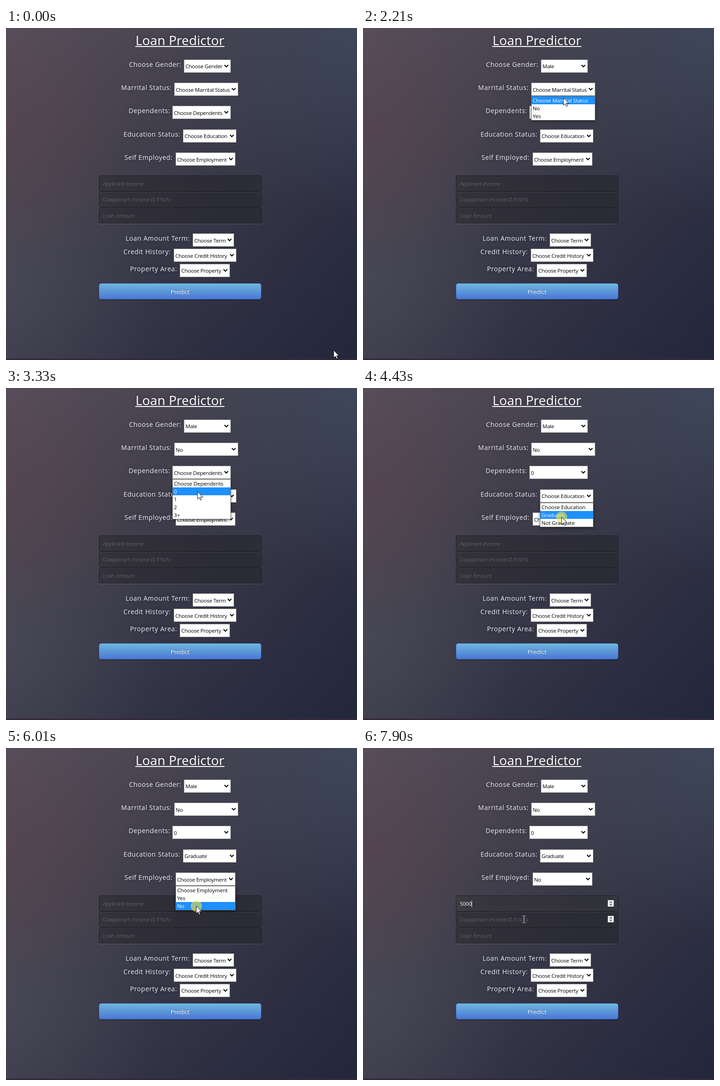
An HTML page for the animation above (8000 ms loop, 760x718 px).

```html
<!DOCTYPE html>
<html lang="en">
<head>
<meta charset="utf-8">
<title>Loan Predictor</title>
<style>
  html, body { margin: 0; width: 100%; height: 100%; overflow: hidden; }
  body {
    position: relative;
    background:
      linear-gradient(#33293b, #33293b) 0 715px / 100% 3px no-repeat,
      radial-gradient(ellipse 260px 300px at 0 210px, rgba(92, 66, 74, .45), rgba(92, 66, 74, 0)),
      radial-gradient(ellipse 420px 420px at 760px 0, rgba(64, 78, 98, .65), rgba(64, 78, 98, 0)),
      radial-gradient(ellipse 330px 330px at 0 560px, rgba(76, 78, 92, .5), rgba(76, 78, 92, 0)),
      linear-gradient(133deg, #574f5c 0%, #47434f 28%, #373747 56%, #2b2d40 80%, #23273b 100%);
  }
  .field, .button {
    position: absolute; left: 201px; width: 352px; height: 35px; box-sizing: border-box;
  }
  .field {
    --glow: .2;
    background: rgba(0, 0, 0, .3);
    border: 1px solid rgba(0, 0, 0, .3);
    border-radius: 4px;
    box-shadow: inset 0 -5px 45px rgba(100, 100, 100, var(--glow)), 0 1px 1px rgba(255, 255, 255, .2);
  }
  .button {
    top: 552px;
    background: linear-gradient(#6eb6de, #4a77d4);
    border: 1px solid #3762bc;
    border-radius: 5px;
    box-shadow: inset 0 1px 0 rgba(255, 255, 255, .2), 0 1px 2px rgba(0, 0, 0, .5);
  }
  svg { position: absolute; left: 0; top: 0; }
  text { font: 11.5px "Open Sans", "Noto Sans", sans-serif; }
  .title { font-size: 28px; letter-spacing: .1px; fill: #fff; text-anchor: middle; }
  .title, .label { text-shadow: 0 0 10px rgba(0, 0, 0, .3); }
  .label { font-size: 14px; letter-spacing: .6px; fill: #eef0f6; text-anchor: middle; }
  .value { letter-spacing: -.22px; }
  .option { letter-spacing: -.08px; }
  .hint { font-weight: 300; letter-spacing: -.1px; fill: #7a787e; }
  .typed { font-size: 11px; fill: #fff; }
  .predict { font-size: 12.5px; fill: #fff; text-anchor: middle; text-shadow: 0 -1px 1px rgba(0, 0, 0, .4); }
  .menu { filter: drop-shadow(0 2px 3px rgba(0, 0, 0, .45)); }
</style>
</head>
<body>
<div class="field" style="top:319px"></div>
<div class="field" style="top:353px"></div>
<div class="field" style="top:388px"></div>
<div class="button"></div>
<svg width="760" height="718" viewBox="0 0 760 718">
  <text class="title" x="376.5" y="37">Loan Predictor</text>
  <path d="M280 40H473" stroke="#fff" stroke-width="1.8"/>
  <g id="form"></g>
  <text class="predict" x="377" y="575">Predict</text>
  <text class="typed" id="typed" x="210" y="341"></text>
  <path id="caret" stroke="#fff"/>
  <g id="menus"></g>
  <circle id="press" r="12" fill="#f6e53c" fill-opacity=".58"/>
  <path id="arrow" d="M0 0V16.2L3.8 12.7 6.3 18.4 8.9 17.3 6.4 11.8H11.6Z" fill="#fff" stroke="#111"/>
  <path id="beam" d="M-3.5 -7.5H-1L0 -6.5 1 -7.5H3.5M0 -6.5V6.5M-3.5 7.5H-1L0 6.5 1 7.5H3.5"
        fill="none" stroke="#d2d2d4"/>
</svg>
<script>
const LOOP = 8000, ROW = 17, BOX_H = 29;
const $ = id => document.getElementById(id);

// Half-pixel tops lower the text by one pixel.
const selects = [
  { label: "Choose Gender:", mid: 323, x: 385, y: 68, w: 102, text: "Choose Gender",
    options: ["Male", "Female"], pick: "Male", open: 870, close: 1620 },
  { label: "Marrital Status:", mid: 304, x: 364, y: 118.5, w: 139, text: "Choose Marrital Status",
    options: ["No", "Yes"], pick: "No", open: 2030, close: 2590 },
  { label: "Dependents:", mid: 310.5, x: 360, y: 168.5, w: 127, text: "Choose Dependents",
    options: ["0", "1", "2", "3+"], pick: "0", open: 2960, close: 3600 },
  { label: "Education Status:", mid: 316, x: 383, y: 219, w: 116, text: "Choose Education",
    options: ["Graduate", "Not Graduate"], pick: "Graduate", open: 4050, close: 4530 },
  { label: "Self Employed:", mid: 308.5, x: 367, y: 269.5, w: 130, text: "Choose Employment",
    options: ["Yes", "No"], pick: "No", open: 4980, close: 6100 },
  { label: "Loan Amount Term:", mid: 328.5, x: 404, y: 444.5, w: 90, text: "Choose Term" },
  { label: "Credit History:", mid: 305.5, x: 363, y: 477.5, w: 136, text: "Choose Credit History", lift: 4 },
  { label: "Property Area:", mid: 319.5, x: 376, y: 510, w: 109, text: "Choose Property" }
];
const fields = [
  { y: 319, hint: "Applicant Income" },
  { y: 353, hint: "Coapplicant Income (0 if N/A)" },
  { y: 388, hint: "Loan Amount" }
];

// Pointer stops: time, x, y
const path = [
  [30, 709.5, 697], [720, 437, 82], [870, 437, 82], [1190, 449.5, 103], [1470, 440, 122],
  [1620, 440, 122], [1880, 438, 135], [2030, 438, 135], [2210, 434, 151], [2440, 430, 172],
  [2590, 430, 172], [2840, 424, 185], [2960, 424, 185], [3300, 414.5, 224], [3600, 414.5, 224],
  [3900, 432, 235], [4050, 432, 235], [4400, 430, 279], [4530, 430, 279], [4840, 428, 286],
  [4980, 428, 286], [5320, 424, 320], [5500, 424, 320], [5550, 423, 324], [5780, 423, 324],
  [5980, 412, 342], [6100, 412, 342], [6420, 352, 340], [7500, 352, 340], [7850, 348.5, 367],
  [7900, 348.5, 370.5]
];
const presses = [720, 1470, 1880, 2440, 2830, 3510, 3910, 4400, 4850, 5970, 6420];
const PRESS_TIME = 130, FOCUS = 6460;
const keys = [[6600, "5"], [7060, "0"], [7200, "0"], [7340, "0"]];

const text = (cls, x, y, str, extra = "") => `<text class="${cls}" x="${x}" y="${y}" ${extra}>${str}</text>`;
const show = (el, on) => { el.style.display = on ? "" : "none"; };

function selectMarkup(s) {
  const y = Math.floor(s.y), right = s.x + s.w;
  return text("label", s.mid, y + 16 - (s.lift || 0), s.label) +
    `<rect x="${s.x + .5}" y="${y + .5}" width="${s.w - 1}" height="${BOX_H - 1}" fill="#fff" stroke="#767676"/>` +
    text("value", s.x + 3.5, Math.ceil(s.y) + 19, s.text) +
    `<path d="M${right - 14} ${y + 12}l4 4 4-4" fill="none" stroke="#000" stroke-width="2"/>`;
}

function menuMarkup(s) {
  const top = Math.floor(s.y) + BOX_H, rows = [s.text, ...s.options];
  return `<g class="menu"><rect x="${s.x + .5}" y="${top + .5}" width="${s.w - 1}" height="${rows.length * ROW + 1}"
    fill="#fff" stroke="#6b6b6b"/><rect class="mark" x="${s.x + 1}" width="${s.w - 2}" height="${ROW}" fill="#1e90ff"/>` +
    rows.map((r, i) => text("option", s.x + 3.5, top + 14 + i * ROW, r)).join("") + "</g>";
}

function fieldMarkup(f) {
  const y = f.y + 10;
  return text("hint", 210, f.y + 22, f.hint) +
    `<g class="spin"><rect x="530" y="${y}" width="13" height="14" fill="#efefef"/>
    <path d="M533.5 ${y + 5.5}l3-3 3 3zM533.5 ${y + 8.5}l3 3 3-3z" fill="#444"/></g>`;
}

$("form").innerHTML = selects.map(selectMarkup).join("") + fields.map(fieldMarkup).join("");
const lists = selects.filter(s => s.options);
$("menus").innerHTML = lists.map(menuMarkup).join("");

const values = document.querySelectorAll(".value");
const menus = document.querySelectorAll(".menu");
const spins = document.querySelectorAll(".spin");
const hint = document.querySelector(".hint");
const firstField = document.querySelector(".field");

function pointerAt(t) {
  const next = path.findIndex(p => p[0] > t);
  if (next < 1) return (next ? path[path.length - 1] : path[0]).slice(1);
  const [t0, x0, y0] = path[next - 1], [t1, x1, y1] = path[next];
  const k = (1 - Math.cos(Math.PI * (t - t0) / (t1 - t0))) / 2;
  return [x0 + (x1 - x0) * k, y0 + (y1 - y0) * k];
}

function drawMenu(s, menu, isOpen, y) {
  show(menu, isOpen);
  if (!isOpen) return;
  const top = Math.floor(s.y) + BOX_H + 1;
  const row = Math.max(0, Math.min(s.options.length, Math.floor((y - top) / ROW)));
  menu.querySelector(".mark").setAttribute("y", top + row * ROW);
  menu.querySelectorAll("text").forEach((el, i) => el.setAttribute("fill", i === row ? "#fff" : "#000"));
}

function draw(t) {
  const [x, y] = pointerAt(t);
  let anyOpen = false;
  lists.forEach((s, i) => {
    const isOpen = t >= s.open && t < s.close;
    anyOpen = anyOpen || isOpen;
    values[i].textContent = t >= s.close ? s.pick : s.text;
    drawMenu(s, menus[i], isOpen, y);
  });

  const focused = t >= FOCUS;
  const hovered = anyOpen || x < 201 || x > 553 ? -1 : fields.findIndex(f => y >= f.y && y < f.y + 34.5);
  spins.forEach((el, i) => show(el, i === hovered || (i === 0 && focused)));

  const typed = keys.filter(k => t >= k[0]).map(k => k[1]).join("");
  $("typed").textContent = typed;
  show(hint, !typed);
  show($("caret"), focused);
  $("caret").setAttribute("d", `M${Math.round(210 + typed.length * 6.3) + .5} 330V344`);
  firstField.style.setProperty("--glow", .2 + .2 * Math.max(0, Math.min(1, (t - FOCUS) / 500)));

  const at = `translate(${x} ${y})`;
  for (const id of ["press", "arrow", "beam"]) $(id).setAttribute("transform", at);
  show($("press"), presses.some(p => t >= p && t < p + PRESS_TIME));
  show($("arrow"), hovered < 0);
  show($("beam"), hovered >= 0);
}

const start = performance.now();
function tick() {
  draw((performance.now() - start) % LOOP);
  requestAnimationFrame(tick);
}
tick();
</script>
</body>
</html>
```
